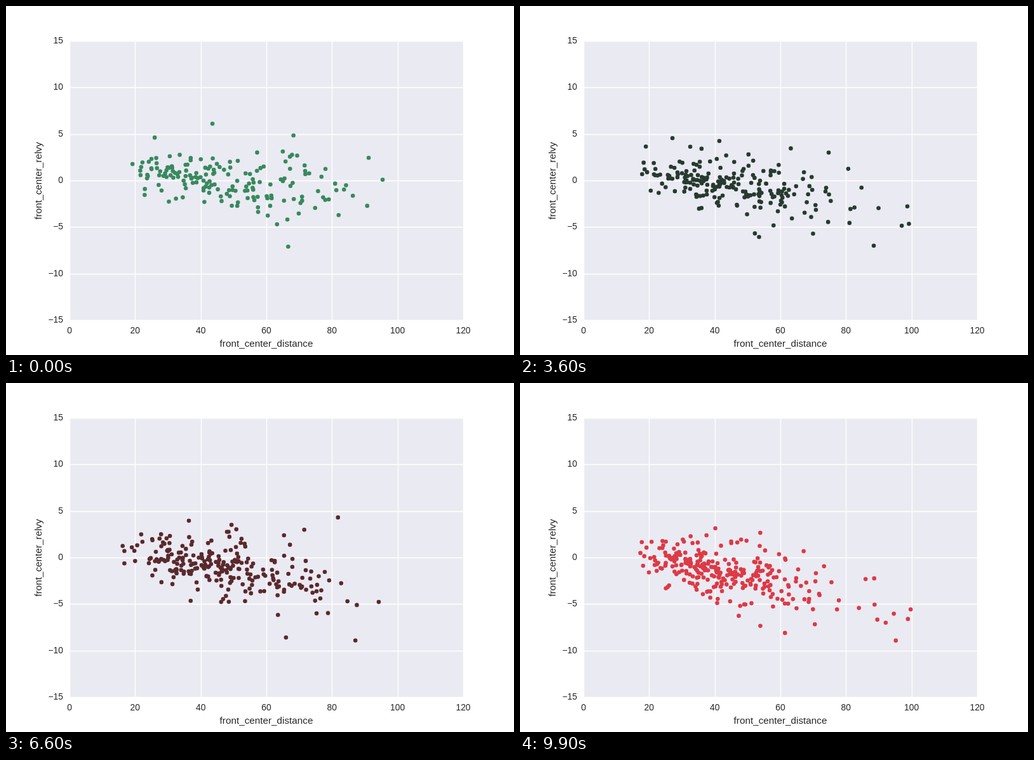
An HTML page for the animation above (10 s loop, 800 px wide and 550 px high).

```html
<!DOCTYPE html>
<html lang="en">
<head>
<meta charset="utf-8">
<title>Distance and relative speed</title>
<style>
  html, body { margin: 0; width: 100%; height: 100%; overflow: hidden; background: #fff; }
  svg { display: block; width: 800px; height: 550px; }
  text { font-family: "Liberation Sans", Arial, sans-serif; font-size: 13.89px; fill: #262626; }
  .label { font-size: 15.28px; text-anchor: middle; }
</style>
</head>
<body>
<svg viewBox="0 0 800 550">
  <rect x="100" y="55" width="620" height="440" fill="#eaeaf2"/>
  <path id="grid" stroke="#fff" stroke-width="1.39" fill="none"/>
  <path id="dots" stroke-width="6.6" stroke-linecap="round" fill="none"/>
  <g id="ticks"></g>
  <text class="label" x="410" y="537">front_center_distance</text>
  <text class="label" transform="translate(56 275.5) rotate(-90)">front_center_relvy</text>
</svg>
<script>
const STEP_MS = 100, STEPS = 100;
const grid = document.getElementById('grid');
const dots = document.getElementById('dots');
const ticks = document.getElementById('ticks');

const px = x => 100 + x * 620 / 120;
const py = y => 275 - y * 440 / 30;
const mix = (a, b, k) => a + (b - a) * k;

function seeded(seed) {
  let s = seed;
  return () => {
    s = (s + 0x6D2B79F5) | 0;
    let t = Math.imul(s ^ (s >>> 15), 1 | s);
    t = (t + Math.imul(t ^ (t >>> 7), 61 | t)) ^ t;
    return ((t ^ (t >>> 14)) >>> 0) / 4294967296;
  };
}

// Log-normal distances; speed falls and spreads with distance.
function readings(step) {
  const random = seeded(step * 7919 + 31);
  const normal = () =>
    Math.sqrt(-2 * Math.log(1 - random())) * Math.cos(2 * Math.PI * random());
  const k = step / (STEPS - 1);
  const count = Math.round(mix(170, 288, k));
  const points = [];
  while (points.length < count) {
    const x = Math.exp(mix(3.88, 3.74, k) + mix(0.4, 0.36, k) * normal());
    if (x < 16 || x > 102) continue;
    const mean = mix(1.1, 0.2, k) - mix(0.04, 0.075, k) * (x - 20);
    const heavyTail = normal() * mix(0.45, 1.6, random());
    const y = mean + heavyTail * (0.7 + 0.018 * x);
    if (Math.abs(y) < 9) points.push([x, y]);
  }
  return points;
}

// Green to near-black to red, with a short flat middle
function colour(step) {
  const offset = step / (STEPS - 1) * 2 - 1;
  const strength = Math.max(0, (Math.abs(offset) - 0.04) / 0.96);
  const end = offset < 0 ? [56, 137, 94] : [220, 58, 70];
  return `rgb(${end.map(c => Math.round(mix(33, c, strength)))})`;
}

function addTick(value, x, y, anchor) {
  const label = document.createElementNS('http://www.w3.org/2000/svg', 'text');
  label.setAttribute('x', x);
  label.setAttribute('y', y);
  label.setAttribute('text-anchor', anchor);
  label.textContent = String(value).replace('-', '\u2212');
  ticks.append(label);
}

function drawAxes() {
  let lines = '';
  for (let x = 0; x <= 120; x += 20) {
    lines += `M${Math.round(px(x)) + 0.5} 55V495`;
    addTick(x, px(x), 516, 'middle');
  }
  for (let y = -15; y <= 15; y += 5) {
    lines += `M100 ${Math.round(py(y)) + 0.5}H720`;
    addTick(y, 90, py(y) + 4, 'end');
  }
  grid.setAttribute('d', lines);
}

const paths = Array.from({ length: STEPS }, (_, step) =>
  readings(step).map(([x, y]) => `M${px(x).toFixed(1)} ${py(y).toFixed(1)}h0`).join(''));

let shown = -1;
function render(now) {
  const step = Math.floor(now / STEP_MS) % STEPS;
  if (step !== shown) {
    shown = step;
    dots.setAttribute('d', paths[step]);
    dots.setAttribute('stroke', colour(step));
  }
}

function tick() {
  render(performance.now());
  requestAnimationFrame(tick);
}

drawAxes();
tick();
</script>
</body>
</html>
```
